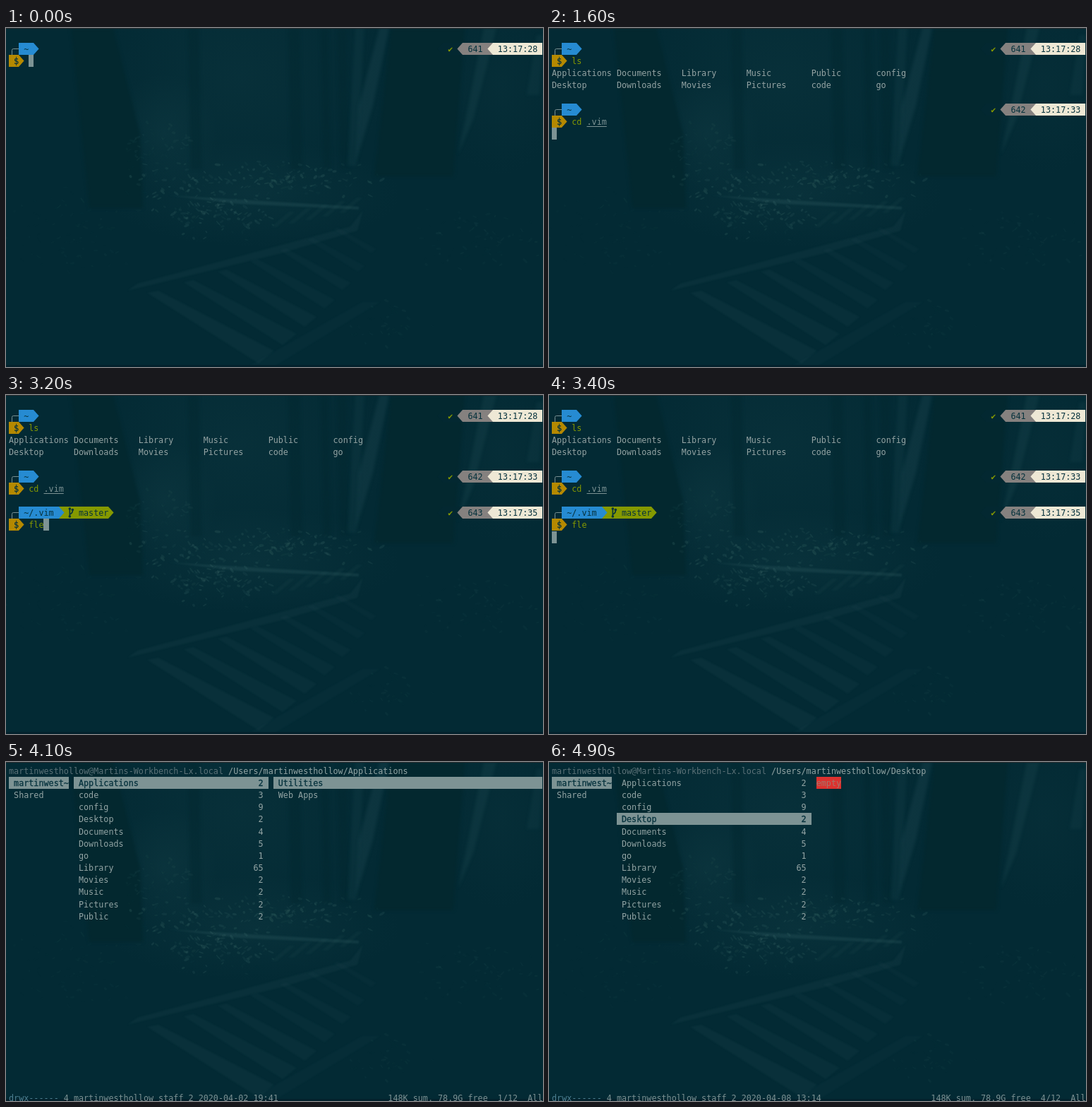
Write an HTML page with a canvas that moves like this. It is 761 px wide and 480 px high and loops after 5000 ms.

```html
<!DOCTYPE html>
<html lang="en">
<head>
<meta charset="utf-8">
<title>Terminal session</title>
<style>
html, body { margin: 0; width: 100%; height: 100%; overflow: hidden; background: #032a34; }
canvas { display: block; }
</style>
</head>
<body>
<canvas id="stage" width="761" height="480"></canvas>
<script>
const W = 761, H = 480, LOOP = 5000;
const CW = 7.07, CH = 17.16, LEFT = 4, TOP = 3.74, COLS = 107;
const FONT = '11.75px "DejaVu Sans Mono", monospace';
const C = {
  ink: '#06323d', text: '#94a3a3', dim: '#5b7177', mid: '#7b9092', bold: '#93a4a4',
  bar: '#7d9394', blue: '#268bd2', yellow: '#b58900', green: '#859900', red: '#dc322f',
  grey: '#85817f', cream: '#eee8d5', shade: '#032831', mode: '#4d7f91'
};
const USER = 'martinwesthollow';
const HOST = 'Martins-Workbench-Lx.local';

const ctx = document.getElementById('stage').getContext('2d');
const colX = c => LEFT + c * CW;
const rowY = r => Math.round(TOP + r * CH);

// ---- backdrop: a dim forest with a plank path ----
function makeForest() {
  const cv = document.createElement('canvas');
  cv.width = W;
  cv.height = H;
  const g = cv.getContext('2d');
  let seed = 17;
  const rand = () => (seed = (seed * 16807) % 2147483647) / 2147483647;
  const poly = (color, ...p) => {
    g.fillStyle = color;
    g.beginPath();
    for (let i = 0; i < p.length; i += 2) g.lineTo(p[i], p[i + 1]);
    g.fill();
  };
  const glow = (x, y, rx, ry, a) => {
    g.save();
    g.translate(x, y);
    g.scale(rx, ry);
    const grad = g.createRadialGradient(0, 0, 0, 0, 0, 1);
    grad.addColorStop(0, `rgba(36,84,90,${a})`);
    grad.addColorStop(1, 'rgba(36,84,90,0)');
    g.fillStyle = grad;
    g.fillRect(-1, -1, 2, 2);
    g.restore();
  };
  const leaves = (n, x, y, w, h, a) => {
    for (let i = 0; i < n; i++) {
      const px = x + (rand() + rand() - 1) * w, py = y + (rand() + rand() - 1) * h;
      g.fillStyle = `rgba(60,106,104,${a * rand()})`;
      g.beginPath();
      g.ellipse(px, py, 1.5 + rand() * 3, 0.8 + rand() * 1.2, rand() * 2 - 1, 0, 7);
      g.fill();
    }
  };

  g.fillStyle = '#032a34';
  g.fillRect(0, 0, W, H);
  glow(330, 70, 210, 190, 0.14);
  glow(225, 150, 75, 85, 0.18);
  glow(700, 80, 90, 130, 0.09);
  glow(350, 235, 210, 75, 0.16);

  // trunks, then lit bark
  g.filter = 'blur(2px)';
  poly('#03282f', 92, 0, 152, 0, 190, 150, 194, 255, 118, 255);
  poly('#03282f', 546, 0, 650, 0, 634, 210, 522, 210);
  for (const [x, w] of [[258, 15], [400, 16], [446, 10], [470, 12]])
    poly('rgba(3,40,48,.5)', x, 0, x + w, 0, x + w + 4, 200, x + 4, 200);
  poly('rgba(54,98,105,.2)', 529, 0, 543, 0, 520, 110, 496, 190, 500, 110);
  poly('rgba(54,98,105,.12)', 495, 0, 508, 0, 497, 195, 484, 195);
  poly('rgba(54,98,105,.16)', 677, 0, 695, 0, 662, 130, 640, 180, 655, 110);
  poly('rgba(54,98,105,.12)', 752, 10, 761, 10, 756, 95, 738, 95);
  g.filter = 'none';

  leaves(190, 350, 215, 200, 28, 0.27);
  leaves(140, 290, 262, 120, 40, 0.27);
  leaves(60, 220, 165, 60, 40, 0.13);
  leaves(80, 90, 290, 110, 70, 0.09);
  leaves(80, 660, 300, 100, 45, 0.11);
  leaves(40, 540, 420, 70, 40, 0.1);

  // rails and planks
  g.filter = 'blur(1px)';
  poly('rgba(60,104,108,.24)', 230, 237, 500, 253, 500, 257, 330, 249);
  poly('rgba(54,96,102,.13)', 172, 372, 186, 362, 488, 281, 506, 258, 498, 287, 390, 319);
  for (let i = 0; i < 7; i++) {
    const k = 1 - i * 0.11, x = 200 + i * 53 - i * i * 1.5, y = 375 - i * 15;
    poly(`rgba(54,94,100,${0.13 - i * 0.01})`, x, y, x + 16 * k, y - 3,
      x + 180 * k, y + 82 * k, x + 158 * k, y + 100 * k);
  }
  for (let i = 0; i < 5; i++) {
    const x = 375 + i * 24, y = 282 - i * 5;
    poly('rgba(54,96,102,.09)', x, y, x + 26, y - 22, x + 35, y - 22, x + 9, y);
  }
  poly('rgba(54,94,100,.08)', 345, 478, 505, 388, 530, 388, 382, 478);
  g.filter = 'none';

  g.fillStyle = '#292c2f';
  g.fillRect(0, 0, W, 1);
  g.fillStyle = '#03212c';
  g.fillRect(0, 477, W, 3);
  return cv;
}
const forest = makeForest();

// ---- character grid ----
function put(str, col, row, color, strong) {
  ctx.font = FONT;
  ctx.fillStyle = ctx.strokeStyle = color;
  ctx.lineWidth = 0.3;
  [...str].forEach((ch, i) => {
    const x = colX(col + i), y = rowY(row) + 13;
    ctx.fillText(ch, x, y);
    if (strong) ctx.strokeText(ch, x, y);
  });
}
function fill(col, row, n, color) {
  const x = Math.round(colX(col));
  ctx.fillStyle = color;
  ctx.fillRect(x, rowY(row), Math.round(colX(col + n)) - x, 17);
}
function arrow(col, row, color, dir) {
  const y = rowY(row), x = Math.round(colX(dir > 0 ? col : col + 1));
  ctx.fillStyle = color;
  ctx.beginPath();
  ctx.moveTo(x, y);
  ctx.lineTo(x + dir * (CW + 0.5), y + 8.5);
  ctx.lineTo(x, y + 17);
  ctx.fill();
}
const cursor = (col, row) => fill(col, row, 1, C.bar);

// ---- shell ----
function branchIcon(x, y) {
  ctx.strokeStyle = ctx.fillStyle = C.ink;
  ctx.lineWidth = 1.6;
  ctx.beginPath();
  ctx.moveTo(x + 2.5, y + 3);
  ctx.lineTo(x + 2.5, y + 14);
  ctx.moveTo(x + 6.5, y + 5);
  ctx.quadraticCurveTo(x + 7, y + 9, x + 2.5, y + 11);
  ctx.stroke();
  for (const [dx, dy] of [[2.5, 3], [6.5, 4.5], [2.5, 14]]) {
    ctx.beginPath();
    ctx.arc(x + dx, y + dy, 1.8, 0, 7);
    ctx.fill();
  }
}

function prompt(row, dir, count, clock, branch) {
  const y = rowY(row) + 8.5;
  ctx.strokeStyle = C.mid;
  ctx.lineWidth = 1;
  ctx.beginPath();
  ctx.moveTo(8.5, rowY(row + 1));
  ctx.lineTo(8.5, y + 2);
  ctx.quadraticCurveTo(8.5, y, 10.5, y);
  ctx.lineTo(18, y);
  ctx.stroke();

  const end = dir.length + 4;
  if (branch) {
    const stop = end + branch.length + 4;
    fill(end, row, stop - end, C.green);
    arrow(stop, row, C.green, 1);
    branchIcon(colX(end + 2) - 1, rowY(row));
    put(branch, end + 4, row, C.ink);
  }
  fill(2, row, end - 2, C.blue);
  arrow(end, row, C.blue, 1);
  put(dir, 3, row, C.ink);

  fill(0, row + 1, 2, C.yellow);
  arrow(2, row + 1, C.yellow, 1);
  put('$', 1, row + 1, C.ink, true);

  arrow(86, row, C.shade, -1);
  fill(87, row, 4, C.shade);
  put('✔', 88, row, C.green);
  arrow(90, row, C.grey, -1);
  fill(91, row, 6, C.grey);
  put(count, 92, row, C.ink);
  arrow(96, row, C.cream, -1);
  fill(97, row, COLS - 97, C.cream);
  put(clock, 98, row, C.ink);
}

// Types one command line; the word turns green once it is a known command.
function command(text, shown, row, done) {
  const typed = text.slice(0, shown), word = text.split(' ')[0];
  const head = typed.slice(0, word.length), arg = typed.slice(word.length + 1);
  put(head, 4, row, head === word ? C.green : C.red, head !== word);
  if (arg) {
    const col = 5 + word.length;
    put(arg, col, row, C.bar);
    ctx.fillStyle = C.bar;
    ctx.fillRect(colX(col), rowY(row) + 15, arg.length * CW, 1);
  }
  if (!done) cursor(4 + typed.length, row);
}

const typedBy = (t, times) => times.filter(x => t >= x).length;
const LS = [
  ['Applications', 'Documents', 'Library', 'Music', 'Public', 'config'],
  ['Desktop', 'Downloads', 'Movies', 'Pictures', 'code', 'go']
];

function shell(t) {
  prompt(1, '~', '641', '13:17:28');
  command('ls', typedBy(t, [200, 300]), 2, t >= 400);
  if (t < 400) return;
  LS.forEach((names, r) => names.forEach((n, i) => put(n, i * 13, 3 + r, C.text)));
  if (t < 500) return cursor(0, 5);

  prompt(6, '~', '642', '13:17:33');
  command('cd .vim', typedBy(t, [700, 800, 900, 1000, 1100, 1200, 1300]), 7, t >= 1500);
  if (t < 1500) return;
  if (t < 1800) return cursor(0, 8);

  prompt(9, '~/.vim', '643', '13:17:35', 'master');
  command('fle', typedBy(t, [2900, 3000, 3200]), 10, t >= 3400);
  if (t >= 3400) cursor(0, 11);
}

// ---- file manager ----
const homeNames = ['Applications', 'code', 'config', 'Desktop', 'Documents', 'Downloads',
  'go', 'Library', 'Movies', 'Music', 'Pictures', 'Public'];
const homeSizes = [2, 3, 9, 2, 4, 5, 1, 65, 2, 2, 2, 2];
const vimNames = ['bundle', 'colors', 'demo', 'README.md', 'vimrc'];
const vimSizes = [9, 1, 8, '2.18 K', '1.98 K'];
const plugins = ['fzf', 'fzf.vim', 'lightline.vim', 'nerdcommenter', 'nerdtree',
  'vim-easymotion', 'vim-multiple-cursors', 'Vundle.vim', 'YouCompleteMe'];
const configs = ['alacritty', 'fzf', 'git', 'htop', 'neofetch', 'nvim', 'ranger', 'tmux', 'zsh'];

function list(col, width, names, sel, sizes) {
  names.forEach((name, i) => {
    const row = i + 1, on = i === sel, size = sizes ? String(sizes[i]) : '';
    const isFile = size.includes('K');
    const color = on ? C.ink : isFile ? C.mid : C.bold;
    const label = name.length >= width ? name.slice(0, width - 2) + '~' : name;
    if (on) fill(col, row, width, C.bar);
    put(label, col + 1, row, color, on);
    put(size, col + width - 1 - size.length, row, color, on);
  });
}

function frameText(path, mode, info, right) {
  put(USER + '@' + HOST, 0, 0, C.dim);
  put(path, 44, 0, C.bold);
  put(mode, 0, 27, C.mode);
  const [links, rest] = info;
  put(`${links} ${USER} staff ${rest}`, 11, 27, C.mid);
  put(right, COLS - right.length, 27, C.mid);
}

function preview(names) {
  if (names.length) return list(53, 54, names, 0);
  fill(53, 1, 5, C.red);
  put('empty', 53, 1, '#a4766c');
}

function vimView(t) {
  frameText(`/Users/${USER}/.vim/bundle`, 'drwxr-xr-x', [11, '9 2020-04-05 18:07'],
    '12.2K sum, 78.9G free  1/5  All');
  list(0, 12, homeNames, 0);
  list(13, 39, vimNames, 0, vimSizes);
  if (t >= 3700) preview(plugins);
}

const stops = [
  { at: 4100, mode: 'drwx------', info: [4, '2 2020-04-02 19:41'], items: ['Utilities', 'Web Apps'] },
  { at: 4600, mode: 'drwxr-xr-x', info: [5, '3 2020-04-04 22:08'], items: ['covid19', USER + '.github.io'] },
  { at: 4700, mode: 'drwxr-xr-x', info: [11, '9 2020-04-05 17:52'], items: configs },
  { at: 4900, mode: 'drwx------', info: [4, '2 2020-04-08 13:14'], items: [] }
];

function homeView(t) {
  const sel = typedBy(t, stops.map(s => s.at)) - 1;
  const { mode, info, items } = stops[sel];
  frameText(`/Users/${USER}/${homeNames[sel]}`, mode, info,
    `148K sum, 78.9G free  ${sel + 1}/12  All`);
  list(0, 12, [USER, 'Shared'], 0);
  list(13, 39, homeNames, sel, homeSizes);
  preview(items);
}

const start = performance.now();
function draw() {
  // the screen refreshes ten times a second
  const t = Math.floor(((performance.now() - start) % LOOP) / 100) * 100;
  ctx.drawImage(forest, 0, 0);
  if (t < 3600) shell(t);
  else if (t < 4100) vimView(t);
  else homeView(t);
  requestAnimationFrame(draw);
}
draw();
</script>
</body>
</html>
```
